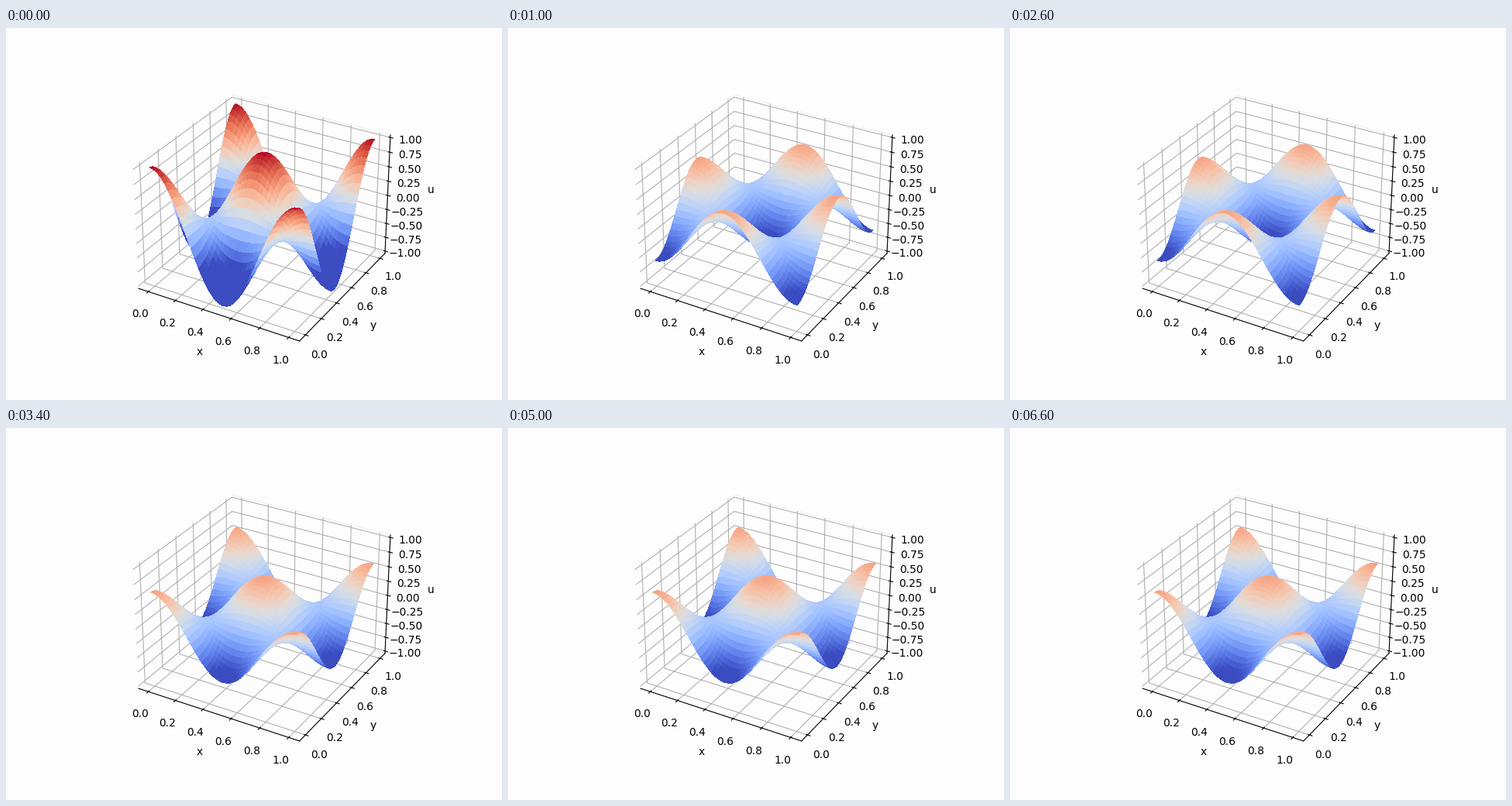
Animation, 640 px wide and 480 px high, one loop 6800 ms. Source, as a matplotlib script:

```python
import numpy as np
import matplotlib.pyplot as plt
from matplotlib import cm
from matplotlib.animation import FuncAnimation

FRAMES = 34
INTERVAL = 200
CELLS = 40             # grid cells along each side
STEPS_PER_PERIOD = 40  # time steps in one oscillation
STEPS_PER_FRAME = 5
PAPER = "#fdfdfd"

fig = plt.figure(figsize=(6.4, 4.8), dpi=100, facecolor=PAPER)
ax = fig.add_subplot(projection="3d", facecolor=PAPER)


def padded(low, high):
    """Limits widened by the small border around the 3D box."""
    pad = (high - low) / 48
    return low - pad, high + pad


ax.set_xlim(*padded(-0.05, 1.05))
ax.set_ylim(*padded(-0.05, 1.05))
ax.set_zlim(*padded(-1, 1))
ax.set_xticks(np.linspace(0, 1, 6))
ax.set_yticks(np.linspace(0, 1, 6))
ax.set_zticks(np.linspace(-1, 1, 9))
ax.set_xlabel("x")
ax.set_ylabel("y")
ax.set_zlabel("u")

for axis, edge in ((ax.xaxis, "#f6f6f6"), (ax.yaxis, "#ececec"), (ax.zaxis, "#f0f0f0")):
    axis.pane.set_facecolor(PAPER)
    axis.pane.set_edgecolor(edge)

side = np.linspace(0, 1, CELLS + 1)
x, y = np.meshgrid(side, side, indexing="ij")
mode = np.cos(2 * np.pi * x) * np.cos(2 * np.pi * y)
surface = None


def amplitude(frame):
    # The start is shown as is; later snapshots follow one step after each batch.
    step = STEPS_PER_FRAME * frame + 1 if frame else 0
    return np.cos(2 * np.pi * step / STEPS_PER_PERIOD)


def draw(frame):
    global surface
    if surface is not None:
        surface.remove()
    surface = ax.plot_surface(x, y, amplitude(frame) * mode, cmap=cm.coolwarm,
                              vmin=-0.5, vmax=1, rstride=1, cstride=1,
                              linewidth=0, antialiased=False)
    return (surface,)


def start():
    return draw(0)


anim = FuncAnimation(fig, draw, frames=FRAMES, init_func=start,
                     interval=INTERVAL, repeat=True, repeat_delay=0, blit=False)
plt.show()
```
